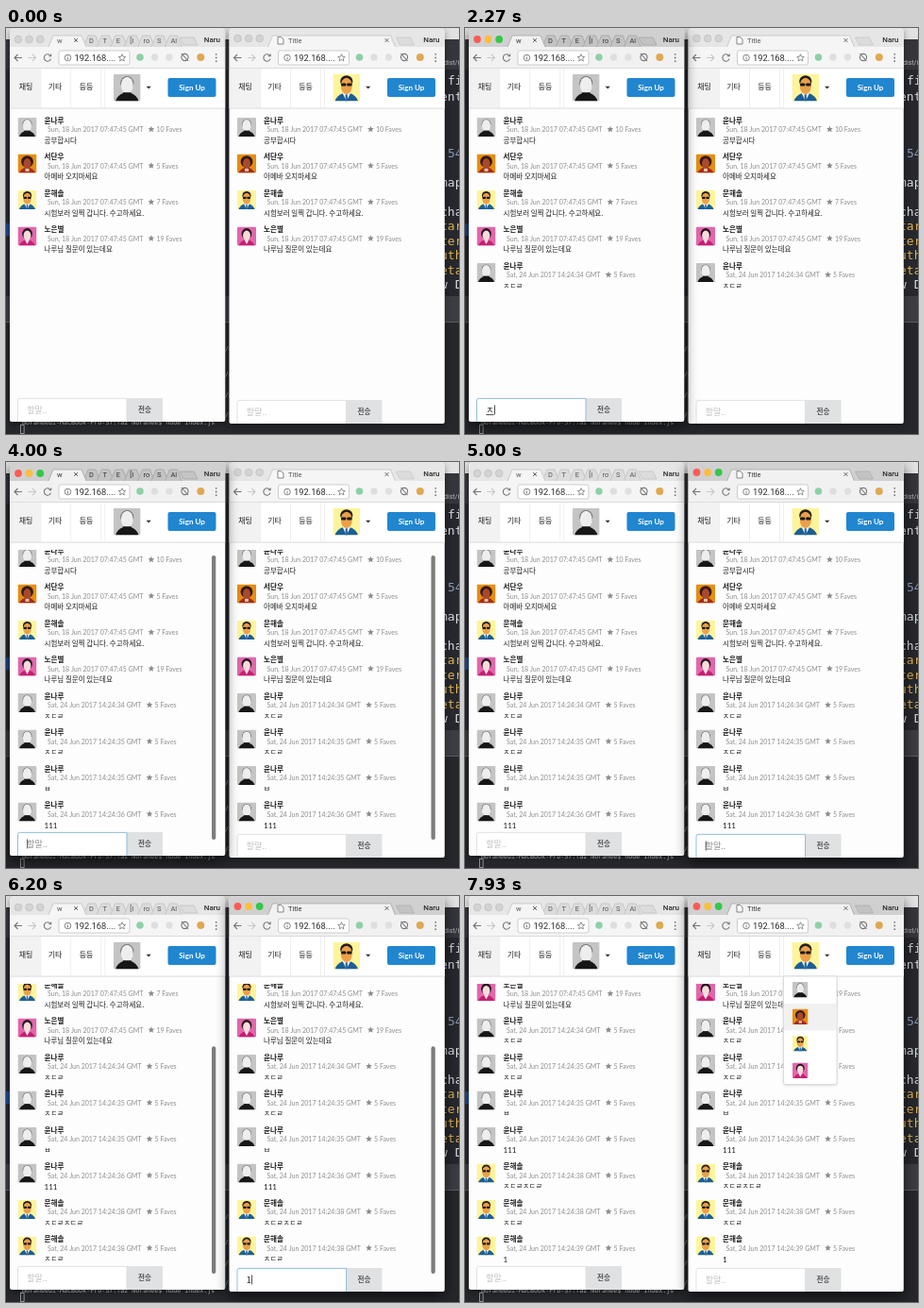
These frames come from a looping animation (480 by 430 pixels, 8 s). An HTML page with a canvas:

```html
<!DOCTYPE html>
<html lang="ko">
<head>
<meta charset="utf-8">
<title>Chat</title>
<style>
html, body { margin: 0; width: 100%; height: 100%; overflow: hidden; background: #24262b; }
canvas { display: block; width: 480px; height: 430px; }
</style>
</head>
<body>
<canvas id="stage"></canvas>
<script>
const LOOP = 8000, ROW = 38.5, SHIFT = 232.5;
const HANGUL = '"Noto Sans CJK KR", "Noto Sans CJK JP", "Noto Sans CJK", sans-serif';
const LATO = 'Lato, ' + HANGUL;
const ROBOTO = 'Roboto, sans-serif';
const MONO = '"DejaVu Sans Mono", monospace';

const canvas = document.getElementById('stage');
const c = canvas.getContext('2d');
const dpr = window.devicePixelRatio || 1;
canvas.width = 480 * dpr;
canvas.height = 430 * dpr;

const people = {
  naru: { name: '윤나루', draw: drawGrey },
  danu: { name: '서단우', draw: drawOrange },
  sol: { name: '문해솔', draw: drawYellow },
  byeol: { name: '노은별', draw: drawPink }
};
const OLD = 'Sun, 18 Jun 2017 07:47:45 GMT';
const old = (who, faves, body) => ({ who, faves, body, date: OLD, at: -1, keys: [] });
const sent = (who, sec, body, at, keys) =>
  ({ who, faves: 5, body, date: `Sat, 24 Jun 2017 14:24:${sec} GMT`, at, keys });

const messages = [
  old('naru', 10, '공부합시다'),
  old('danu', 5, '아메바 오지마세요'),
  old('sol', 7, '시험보러 일찍 갑니다. 수고하세요.'),
  old('byeol', 19, '나루님 질문이 있는데요'),
  sent('naru', 34, 'ㅈㄷㄹ', 2200, [1530, 1670, 1800]),
  sent('naru', 35, 'ㅈㄷㄹ', 2670, [2260, 2400, 2530]),
  sent('naru', 35, 'ㅂ', 3130, [2930]),
  sent('naru', 36, '111', 3600, [3270, 3330, 3400]),
  sent('sol', 38, 'ㅈㄷㄹㅈㄷㄹ', 5530, [5070, 5130, 5200, 5270, 5330, 5400]),
  sent('sol', 38, 'ㅈㄷㄹ', 6070, [5700, 5800, 5930]),
  sent('sol', 39, '1', 6330, [6200])
];
const windows = [
  { x: 0, bottom: 417, owner: 'naru', front: [600, 4270], focus: [600, 4270] },
  { x: SHIFT, bottom: 419, owner: 'sol', front: [4270, LOOP], focus: [4530, 7400] }
];
const MENU_OPEN = 7470, MENU_SECOND = 7730;
const within = (t, [a, b]) => t >= a && t < b;

function rect(x, y, w, h, fill) {
  c.fillStyle = fill;
  c.fillRect(x, y, w, h);
}
function box(x, y, w, h, r, fill, stroke) {
  c.beginPath();
  c.roundRect(x, y, w, h, r);
  if (fill) { c.fillStyle = fill; c.fill(); }
  if (stroke) { c.strokeStyle = stroke; c.lineWidth = 0.9; c.stroke(); }
}
function disc(x, y, r, fill, stroke) {
  c.beginPath();
  c.arc(x, y, r, 0, Math.PI * 2);
  if (fill) { c.fillStyle = fill; c.fill(); }
  if (stroke) { c.strokeStyle = stroke; c.stroke(); }
}
function oval(x, y, rx, ry, fill) {
  c.beginPath();
  c.ellipse(x, y, rx, ry, 0, 0, Math.PI * 2);
  c.fillStyle = fill;
  c.fill();
}
function poly(points, fill, stroke, open) {
  c.beginPath();
  points.forEach(([x, y], i) => i ? c.lineTo(x, y) : c.moveTo(x, y));
  if (!open) c.closePath();
  if (fill) { c.fillStyle = fill; c.fill(); }
  if (stroke) { c.strokeStyle = stroke; c.stroke(); }
}
// y is the visual middle of the line
function text(s, x, y, size, fill, family = LATO, weight = 400, align = 'left') {
  c.font = `${weight} ${size}px ${family}`;
  c.textAlign = align;
  c.textBaseline = 'alphabetic';
  c.fillStyle = fill;
  c.fillText(s, x, y + size * 0.36);
  return c.measureText(s).width;
}
function star(x, y, r, fill, stroke) {
  const pts = Array.from({ length: 10 }, (_, i) => {
    const a = i * Math.PI / 5 - Math.PI / 2, d = i % 2 ? r * 0.45 : r;
    return [x + d * Math.cos(a), y + d * Math.sin(a)];
  });
  poly(pts, fill, stroke);
}
function cross(x, y, r, color) {
  c.lineWidth = 1;
  poly([[x - r, y - r], [x + r, y + r]], null, color, true);
  poly([[x + r, y - r], [x - r, y + r]], null, color, true);
}

// Avatars live in a 20 by 20 square
function avatar(who, x, y, size) {
  c.save();
  c.translate(x, y);
  c.scale(size / 20, size / 20);
  c.beginPath();
  c.roundRect(0, 0, 20, 20, 1);
  c.clip();
  people[who].draw();
  c.restore();
}
function shoulders(top, fill) {
  c.beginPath();
  c.moveTo(1.5, 20);
  c.quadraticCurveTo(2.5, top + 2, 7.5, top);
  c.lineTo(12.5, top);
  c.quadraticCurveTo(17.5, top + 2, 18.5, 20);
  c.fillStyle = fill;
  c.fill();
}
function drawGrey() {
  rect(0, 0, 20, 20, '#c4c4c5');
  shoulders(14, '#171717');
  oval(10, 6.8, 4.9, 5.2, '#6d6d6d');
  oval(10, 8.4, 4.5, 6.4, '#eeeeee');
  rect(7, 13.6, 6, 3, '#171717');
}
function drawOrange() {
  rect(0, 0, 20, 20, '#e58d12');
  shoulders(14.5, '#a32b20');
  oval(10, 8, 6.4, 6.3, '#351a16');
  oval(10, 10, 4, 5.4, '#a8492e');
  rect(8, 15.4, 4, 3, '#e9c9a0');
}
function drawYellow() {
  rect(0, 0, 20, 20, '#fdf49c');
  shoulders(14.2, '#1c5f94');
  poly([[7, 14], [13, 14], [10, 20]], '#f6f6ee');
  poly([[9.3, 15], [10.7, 15], [11, 20], [9, 20]], '#2b6ca3');
  oval(10, 5.4, 4.6, 4.4, '#241c18');
  oval(10, 8.8, 4.2, 6, '#eba04a');
  box(6, 6.8, 3.7, 2.1, 0.8, '#17181c');
  box(10.3, 6.8, 3.7, 2.1, 0.8, '#17181c');
}
function drawPink() {
  rect(0, 0, 20, 20, '#e366aa');
  oval(10, 7.4, 5.4, 5.8, '#271620');
  shoulders(14.3, '#c51f70');
  oval(10, 9.2, 3.9, 5.2, '#f7dcdc');
  poly([[7.6, 14], [12.4, 14], [10, 18.5]], '#f7e3ea');
}

function drawDesk() {
  rect(0, 0, 480, 430, '#25272c');
  rect(0, 0, 480, 12, '#e2e2e3');
  rect(0, 12, 480, 32, '#34363b');
  rect(0, 44, 480, 240, '#26282e');
  rect(0, 284, 480, 28, '#3b3d42');
  rect(0, 311, 480, 1, '#5a5c60');
  rect(0, 312, 480, 118, '#25272b');
  rect(0, 207, 4, 13, '#20458c');
  text('dist/i', 464, 36, 7, '#b8bac0', ROBOTO);
  const white = '#d8dae0', gold = '#e2b34c';
  const code = [['fi', 55, white, 468], ['ent', 72, white], ['54', 132, '#8a9bb5', 468],
    ['map', 163, white], ['cha', 194, white], ['tar', 209, gold], ['ter', 225, gold],
    ['uth', 240, gold], ['eta', 256, gold], ['w D', 271, white]];
  code.forEach(([s, y, color, x = 460]) => text(s, x, y, 13, color, MONO));
  [340, 367, 389, 410].forEach(y => text('/a', 232, y, 6.6, '#a5a7aa', MONO));
  text('moraneeui-MacBook-Pro-57:fa2 moranee$ node index.js', 17, 417.3, 6.67, '#c4c6c8', MONO);
  c.lineWidth = 0.8;
  c.strokeStyle = '#aeb0b2';
  c.strokeRect(15.5, 420.5, 3.6, 9);
}

function drawTab(x, w, fill, line) {
  c.lineWidth = 0.8;
  poly([[x, 20], [x + 5, 8], [x + w - 5, 8], [x + w, 20]], fill, line, true);
}
function drawTabs(left, active) {
  const bar = active ? '#d1d0d1' : '#e7e6e7', page = active ? '#f2f1f2' : '#f6f5f6';
  const back = active ? '#c4c3c4' : '#dddcdd', line = active ? '#a5a4a5' : '#c2c1c2';
  const ink = active ? '#333' : '#555';
  rect(4, 0, 228.5, 21, bar);
  ['#fc5b57', '#fdbd3e', '#34c84a'].forEach((color, i) => {
    c.lineWidth = 0.6;
    disc(13 + i * 11.6, left ? 12 : 11, 3.9, active ? color : '#d4d3d4', active ? null : '#bcbbbc');
  });
  if (left) {
    const names = ['D', 'T', 'E', '[I', 'ro', 'S', 'Al'];
    names.forEach((s, i) => {
      const x = 82 + i * 14.4;
      drawTab(x, 18, back, line);
      text(s, x + 6, 13, 7.5, ink, ROBOTO);
    });
    poly([[184, 10], [199, 10], [203, 18], [188, 18]], back, line);
    drawTab(45, 40, page, line);
    text('w', 54, 13, 7.5, ink, ROBOTO);
    cross(74, 13, 1.9, '#666');
  } else {
    poly([[181, 10], [196, 10], [200, 18], [185, 18]], back, line);
    drawTab(45, 135, page, line);
    poly([[55.5, 9.5], [59, 9.5], [61.5, 12], [61.5, 17], [55.5, 17]], '#fff', '#666');
    text('Title', 66.5, 13, 7.5, ink, ROBOTO);
    cross(171, 13, 1.9, '#666');
  }
  text('Naru', 227, 11.7, 8, '#2a2a2a', ROBOTO, 500, 'right');
  rect(4, 20, 228.5, 22.5, page);
  rect(4, 42, 228.5, 0.8, '#c9c8c9');
}
function arrow(x, y, dir, color) {
  c.lineWidth = 1.1;
  poly([[x - 4 * dir, y], [x + 4 * dir, y]], null, color, true);
  poly([[x + 0.5 * dir, y - 3.5], [x + 4 * dir, y], [x + 0.5 * dir, y + 3.5]], null, color, true);
}
function drawToolbar() {
  c.save();
  c.translate(0, 0.5);
  arrow(13, 31, -1, '#757575');
  arrow(27.5, 31, 1, '#c8c8c8');
  c.lineWidth = 1.1;
  c.strokeStyle = '#757575';
  c.beginPath();
  c.arc(44, 31, 3.6, 0.3, 5.4);
  c.stroke();
  poly([[45, 29.8], [48.2, 29.8], [48.2, 26.6]], '#757575');
  box(56, 23.5, 75, 15, 2, '#fff', '#c8c8c8');
  disc(65.5, 31, 3.3, null, '#777');
  rect(65.1, 30.4, 0.9, 2.6, '#777');
  rect(65.1, 28.8, 0.9, 0.9, '#777');
  text('192.168....', 72.5, 31, 9.3, '#2c2c2c', ROBOTO);
  c.lineWidth = 0.8;
  star(123, 31.2, 4, null, '#777');
  disc(142, 30.5, 3.8, '#8ed0a7');
  disc(157.5, 30.5, 3.7, '#dedede');
  disc(173, 30.5, 3.7, '#e0e0e0');
  c.lineWidth = 1.1;
  disc(189.5, 30.5, 3.6, null, '#757575');
  poly([[186, 26.5], [193, 34.5]], null, '#757575', true);
  disc(206.3, 30.5, 4, '#dfa852');
  [27.3, 31, 34.7].forEach(y => disc(222.7, y, 0.9, '#757575'));
  c.restore();
}
function drawHeader(owner) {
  rect(4, 42.8, 228.5, 42.2, '#fff');
  rect(4, 42.8, 32.5, 42.2, '#f2f2f2');
  [36.5, 68.5, 100.5, 104.5].forEach(x => rect(x, 43, 0.7, 42, '#e8e8e8'));
  [['채팅', 21], ['기타', 52], ['등등', 85]].forEach(([s, x]) =>
    text(s, x, 62.5, 8, '#222', HANGUL, 500, 'center'));
  avatar(owner, 114, 48.8, 28.6);
  poly([[148.6, 61.7], [153.8, 61.7], [151.2, 64.6]], '#333');
  box(171.5, 53, 51, 20, 2, '#2186d0');
  text('Sign Up', 197, 63, 8.05, '#fff', LATO, 700, 'center');
  rect(4, 84.6, 228.5, 1, '#dcdcdd');
}

function drawRow(m, y) {
  const p = people[m.who];
  avatar(m.who, 12.5, y - 3, 20);
  text(p.name, 40.5, y + 0.2, 7.6, '#1c1c1c', HANGUL, 700);
  const w = text(m.date, 44, y + 9.7, 7.05, '#8f8f8f');
  star(44 + w + 8.5, y + 9.3, 3.6, '#8c8c8c');
  text(m.faves + ' Faves', 44 + w + 14, y + 9.7, 7.05, '#8f8f8f');
  const digits = /^\d+$/.test(m.body);
  text(m.body, 40.5, y + 21.2, digits ? 8.05 : 7.5, '#1e1e1e', digits ? LATO : HANGUL, digits ? 400 : 500);
}
function drawList(t, inputTop) {
  const shown = messages.filter(m => t >= m.at);
  const last = shown[shown.length - 1];
  const offset = Math.max(0, shown.length * ROW - 304);
  const fresh = offset === 0 && t - last.at < 130 && last.at > 0;
  const bottom = fresh ? 83 + shown.length * ROW : inputTop;
  c.save();
  c.beginPath();
  c.rect(4, 93, 228, bottom - 93);
  c.clip();
  shown.forEach((m, i) => {
    const y = 98 + i * ROW - offset;
    if (y > 60) drawRow(m, y);
  });
  c.restore();
  if (!offset) return;
  const alpha = Math.min(1, Math.max(0, (900 - (t - last.at)) / 250));
  const h = 308 * 308 / (308 + offset) - 3;
  c.globalAlpha = alpha;
  box(218, 400 - h, 4.3, h, 2.1, '#7d7d7d');
  c.globalAlpha = 1;
}

function inputState(win, t) {
  let typed = '', last = win.focus[0];
  for (const m of messages.filter(m => m.who === win.owner && m.at > 0)) {
    const keys = m.keys.filter(k => k <= t);
    if (keys.length && t < m.at) typed = m.body.slice(0, keys.length);
    for (const e of [...keys, m.at]) if (e <= t) last = Math.max(last, e);
  }
  return { typed, caret: (t - last) % 1000 < 500 };
}
function drawInput(win, t, top) {
  const focused = within(t, win.focus);
  const { typed, caret } = inputState(win, t);
  const h = win.bottom - top, mid = top + 12.4;
  rect(128, top, 38, h, '#e0e1e2');
  text('전송', 147, mid, 7.6, '#555', HANGUL, 700, 'center');
  box(12.5, top + 0.4, 115.5, h + 4, [2, 0, 0, 0], '#fff', focused ? '#85b7d9' : '#dedede');
  let end = 22.3;
  if (typed) {
    const w = text(typed, 22.3, mid, 9, '#222', HANGUL);
    end += w + 0.5;
    if (!/\d/.test(typed)) {
      const tail = c.measureText(typed.slice(-1)).width;
      rect(end - tail - 0.5, mid + 4.8, tail, 0.9, '#333');
    }
  } else {
    text('할말..', 22.3, mid, 9, focused ? '#8c8c8c' : '#c0c0c0', HANGUL);
  }
  if (focused && caret) rect(end, mid - 5, 0.8, 10, '#222');
}

function drawMenu(t) {
  c.save();
  c.shadowColor = 'rgba(0,0,0,.18)';
  c.shadowBlur = 3 * dpr;
  c.shadowOffsetY = dpr;
  box(105, 85, 56.5, 114.5, [0, 0, 2, 2], '#fff');
  c.restore();
  box(105, 85, 56.5, 114.5, [0, 0, 2, 2], null, '#d9d9da');
  const hover = t < MENU_SECOND ? 0 : 1;
  rect(105.4, 85.4 + hover * 28.5, 55.7, 28.5, '#f1f1f1');
  Object.keys(people).forEach((who, i) => avatar(who, 114.5, 91 + i * 28.5, 16.5));
}

function drawWindow(win, t) {
  const active = within(t, win.front), left = win.x === 0;
  const frame = [4, 0.3, 228.3, win.bottom - 0.3, [4, 4, 2, 2]];
  c.save();
  c.translate(win.x, 0);
  c.save();
  c.shadowColor = active ? 'rgba(0,0,0,.65)' : 'rgba(0,0,0,.4)';
  c.shadowBlur = (active ? 14 : 7) * dpr;
  c.shadowOffsetY = (active ? 5 : 2) * dpr;
  box(...frame, '#fdfdfd');
  c.restore();
  c.beginPath();
  c.roundRect(...frame);
  c.clip();
  drawTabs(left, active);
  drawToolbar();
  drawHeader(win.owner);
  const top = win.bottom - 25;
  drawList(t, top);
  drawInput(win, t, top);
  if (!left && t >= MENU_OPEN) drawMenu(t);
  c.restore();
}

function draw(t) {
  c.setTransform(dpr, 0, 0, dpr, 0, 0);
  drawDesk();
  const order = within(t, windows[0].front) ? [1, 0] : [0, 1];
  order.forEach(i => drawWindow(windows[i], t));
}

const start = performance.now();
function tick() {
  draw((performance.now() - start) % LOOP);
  requestAnimationFrame(tick);
}
tick();
</script>
</body>
</html>
```
